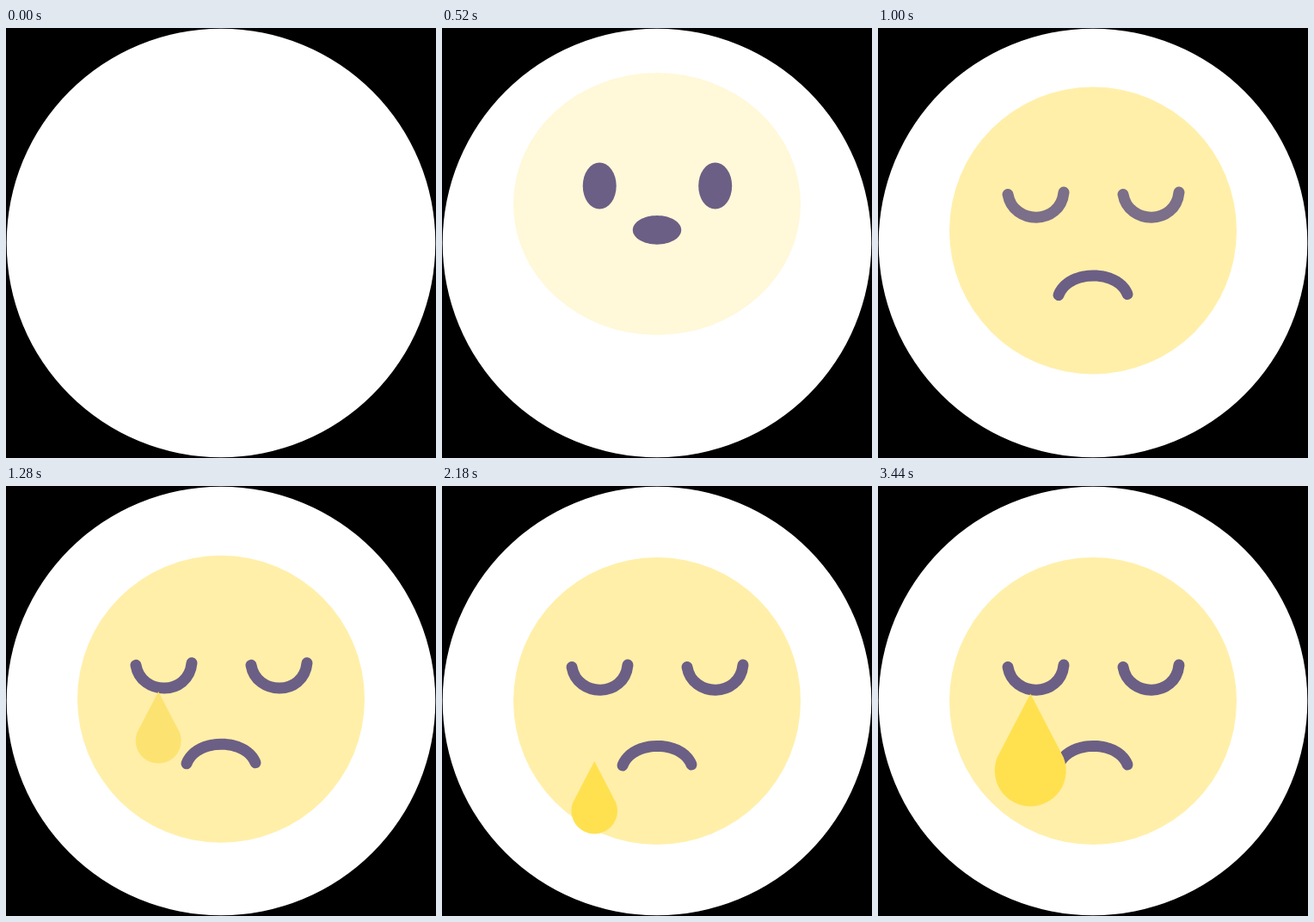
Write an HTML page that moves like this. It is 500 px wide and 500 px high and loops after 3.46 s.

```html
<!DOCTYPE html>
<html lang="en">
<head>
<meta charset="utf-8">
<title>Sad face</title>
<style>
  html, body { margin: 0; width: 100%; height: 100%; overflow: hidden; background: #000; }
  svg { display: block; width: 100vw; height: 100vh; }
  .ink { fill: #6b5f85; stroke: #6b5f85; stroke-linejoin: round; stroke-linecap: round; }
  .line { fill: none; stroke-width: 13; }
  .dot { stroke: none; }
</style>
</head>
<body>
<svg viewBox="0 0 500 500">
  <circle cx="250" cy="250" r="249.3" fill="#fff"/>
  <g id="head">
    <ellipse id="skin" cx="250" cy="250" rx="167" ry="167" fill="#ffefa9"/>
    <g id="features">
      <g id="open" class="ink dot">
        <ellipse cx="183.2" cy="229" rx="19.5" ry="27"/>
        <ellipse cx="317.7" cy="229" rx="19.5" ry="27"/>
      </g>
      <g id="closed" class="ink line">
        <path d="M151 210.5C157 246 212 247 216 208"/>
        <path d="M285 210.5C291 246 346 247 350 208"/>
      </g>
      <path id="mouth" class="ink"/>
    </g>
  </g>
  <path id="tear" d="M0 0L38.5 74A41.5 41.5 0 1 1 -38.5 74Z"/>
</svg>
<script>
  const LOOP = 3460, ENTER = 310, TEAR_START = 1000, TEAR_LOOP = 2000;
  const PALE = [248, 230, 162], YELLOW = [255, 225, 79];
  const [head, skin, features, open, closed, mouth, tear] =
    ['head', 'skin', 'features', 'open', 'closed', 'mouth', 'tear']
      .map(id => document.getElementById(id));

  const ramp = (t, from, to) => Math.min(1, Math.max(0, (t - from) / (to - from)));
  const smooth = u => u * u * (3 - 2 * u);
  const mix = (a, b, u) => a + (b - a) * u;
  const set = (el, attrs) => {
    for (const name in attrs) el.setAttribute(name, attrs[name]);
  };
  const cubic = (a, b, c, d, s) => {
    const r = 1 - s;
    return a * r * r * r + 3 * b * r * r * s + 3 * c * r * s * s + d * s * s * s;
  };

  // The round mouth flattens into a stroked arc.
  function mouthPath(u) {
    const points = [];
    for (let i = 0; i < 64; i++) {
      const angle = i / 64 * 2 * Math.PI;
      const s = (1 + Math.cos(angle)) / 2;
      const x = mix(250 + 28.2 * Math.cos(angle), cubic(210, 221, 279, 290, s), u);
      const y = mix(280.3 + 16.8 * Math.sin(angle), cubic(325, 295, 295, 324, s), u);
      points.push(x.toFixed(2) + ' ' + y.toFixed(2));
    }
    return 'M' + points.join('L') + 'Z';
  }

  function drawHead(t) {
    const rise = 61 * Math.pow(1 - ramp(t, 320, 1380), 1.4);
    set(head, { transform: `translate(0 ${-rise})`, opacity: t < ENTER ? 0 : 1 });
    set(skin, { ry: 167 * mix(0.85, 1, ramp(t, 320, 800)), opacity: ramp(t, 320, 775) });
    set(features, { opacity: ramp(t, 320, 440) });

    const shut = ramp(t, 700, 1040);
    set(open, { opacity: 1 - ramp(t, 600, 850) });
    set(closed, { opacity: shut, transform: `translate(0 ${-22 * (1 - shut)})` });

    const bend = smooth(ramp(t, 560, 960));
    set(mouth, { d: mouthPath(bend), 'stroke-width': 13 * bend });
  }

  function drawTear(t) {
    const p = t < TEAR_START ? 0 : (t - TEAR_START) % TEAR_LOOP;
    const grow = smooth(ramp(p, 140, 420));
    const fall = ramp(p, 380, 1400);
    const size = (35 + 96 * Math.min(grow, 1 - fall ** 3)) / 131;
    const top = 237 + 4 * grow + 128 * fall * fall;
    const tint = smooth(ramp(p, 130, 400));
    set(tear, {
      transform: `translate(177.2 ${top}) scale(${size})`,
      fill: `rgb(${PALE.map((v, i) => Math.round(mix(v, YELLOW[i], tint)))})`,
      opacity: ramp(p, 0, 140) * (1 - ramp(p, 1400, 1800))
    });
  }

  const start = performance.now();
  function draw(now) {
    const t = Math.max(0, now - start) % LOOP;
    drawHead(t);
    drawTear(t);
    requestAnimationFrame(draw);
  }
  draw(start);
</script>
</body>
</html>
```
